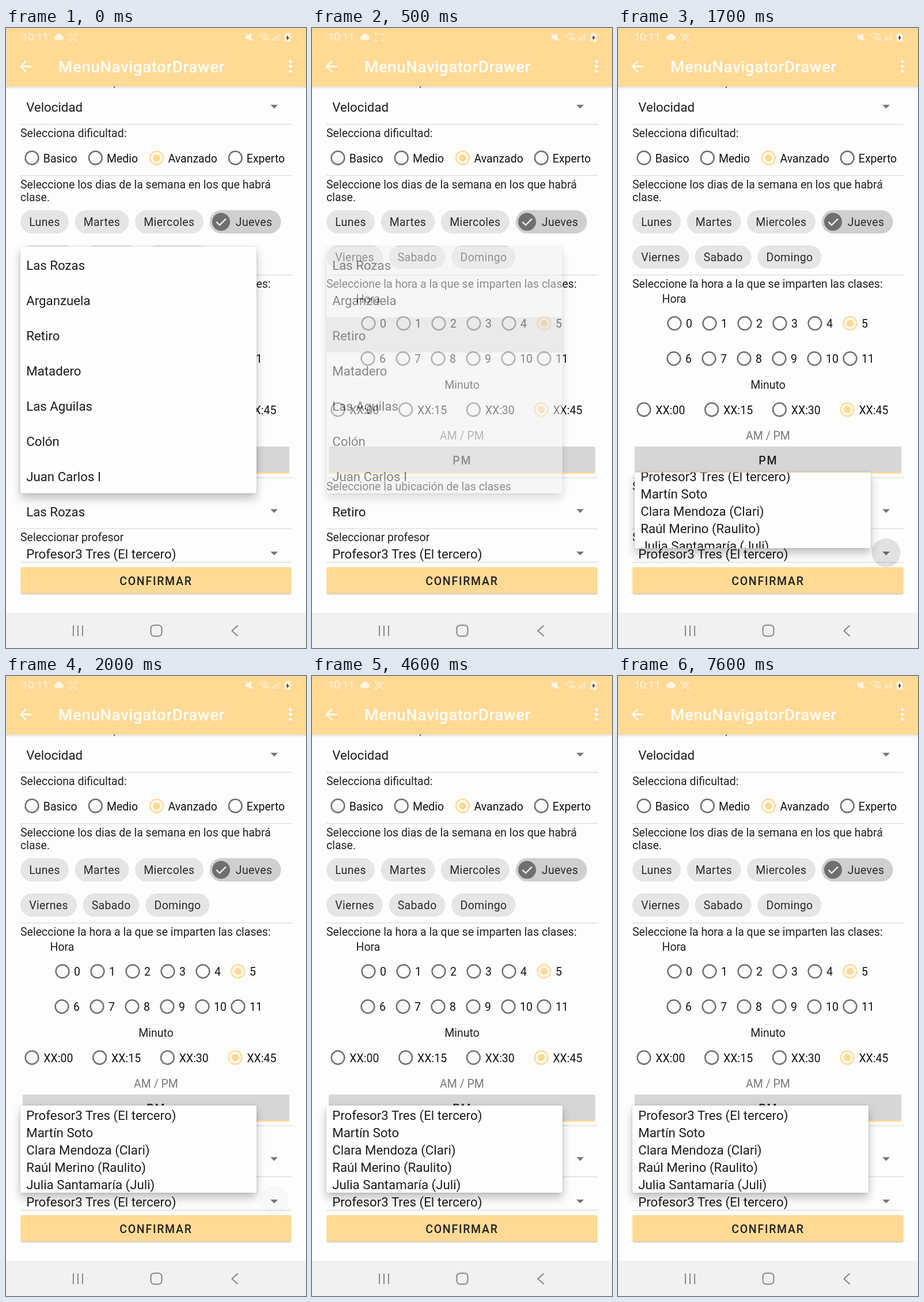
An HTML page that plays this animation: 521 by 1074 pixels, repeating every 8 s.

```html
<!DOCTYPE html>
<html lang="es">
<head>
<meta charset="utf-8">
<title>MenuNavigatorDrawer</title>
<style>
  html, body { margin: 0; width: 100%; height: 100%; overflow: hidden; background: #fdfdfd; }
  body { position: relative; font-family: Roboto, "Open Sans", sans-serif; }
  svg { position: absolute; left: 0; top: 0; display: block; }
  text { font-size: 19.5px; fill: #212121; }
  .big { font-size: 22.28px; fill: #1c1c1c; }
  .radio { fill: #111; }
  .chip { letter-spacing: .35px; fill: #2b2b2b; }
  .btn { font-weight: 500; letter-spacing: 1.74px; }
  .title { font-size: 27.85px; font-weight: 500; letter-spacing: .5px; fill: #fffdf8; }

  .popup {
    position: absolute; left: 25px; width: 410px; overflow: hidden; border-radius: 2px;
    background: #fefefe; color: #1c1c1c; font-size: 22.28px; white-space: nowrap;
    box-shadow: 0 9px 16px rgba(0,0,0,.24), 0 0 5px rgba(0,0,0,.13);
  }
  .popup p { position: relative; margin: 0; padding-left: 10.2px; }
  .popup span { position: relative; top: 2px; }
  #places { top: 379px; height: 427px; animation: places 8s linear infinite; }
  #places p { line-height: 61px; }
  #hit { animation: hit 8s linear infinite; }
  #staff { top: 744px; height: 151px; animation: reveal 8s infinite, appear 8s linear infinite; }
  #staff p { line-height: 30px; }
  #rows { animation: rows 8s infinite; }
  #before { animation: before 8s step-end infinite; }
  #after { animation: after 8s step-end infinite; }
  #ripple { transform-origin: 465.5px 909px; animation: ripple 8s ease-out infinite; }
  #lens { animation: blink 1s step-end infinite; }

  @keyframes places {
    0%, 5% { opacity: 1; background: #fefefe; }
    6.25% { opacity: .53; background: #f0f0f0; }
    7.6%, 100% { opacity: 0; background: #f0f0f0; }
  }
  @keyframes hit {
    0%, 3.5% { background: transparent; }
    5%, 100% { background: rgba(0,0,0,.09); }
  }
  @keyframes before { 0% { opacity: 1; } 5.5%, 100% { opacity: 0; } }
  @keyframes after { 0% { opacity: 0; } 5.5%, 100% { opacity: 1; } }
  @keyframes reveal {
    0%, 19.75% { left: 53px; top: 909px; height: 21px; animation-timing-function: cubic-bezier(0,0,.2,1); }
    22.75%, 100% { left: 25px; top: 744px; height: 151px; }
  }
  @keyframes rows {
    0%, 19.75% { transform: translateY(-65px); animation-timing-function: cubic-bezier(0,0,.2,1); }
    22.75%, 100% { transform: none; }
  }
  @keyframes appear {
    0%, 19.75% { opacity: 0; }
    21%, 100% { opacity: 1; }
  }
  @keyframes ripple {
    0%, 15.8% { opacity: 0; transform: scale(.5); }
    18%, 23.5% { opacity: 1; transform: none; }
    26%, 100% { opacity: 0; transform: none; }
  }
  @keyframes blink {
    0% { opacity: .6; }
    10% { opacity: 0; }
    52% { opacity: .5; }
    60%, 100% { opacity: 1; }
  }
</style>
</head>
<body>
<svg id="screen" width="521" height="1074" viewBox="0 0 521 1074"></svg>
<div class="popup" id="places"></div>
<div class="popup" id="staff"><div id="rows"></div></div>

<script>
const GOLD = '#ffda95', GREY = '#707070';
const $ = id => document.getElementById(id);

const text = (x, y, s, cls = '', extra = '') => `<text x="${x}" y="${y}" class="${cls}" ${extra}>${s}</text>`;
const rect = (x, y, w, h, fill, r = 0) => `<rect x="${x}" y="${y}" width="${w}" height="${h}" rx="${r}" fill="${fill}"/>`;
const dot = (x, y, r, fill, extra = '') => `<circle cx="${x}" cy="${y}" r="${r}" fill="${fill}" ${extra}/>`;
const stroke = (d, color, w, extra = '') => `<path d="${d}" fill="none" stroke="${color}" stroke-width="${w}" ${extra}/>`;
const fill = (d, color) => `<path d="${d}" fill="${color}"/>`;
const rule = y => rect(25, y - .75, 471, 1.5, '#dedede');
const arrow = y => fill(`M459.3 ${y - 3.2}h12.8l-6.4 6.4z`, '#757575');

function radio(x, y, label, lx, on) {
  const c = on ? GOLD : GREY;
  return dot(x, y, 11.4, 'none', `stroke="${c}" stroke-width="2.5"`) +
    (on ? dot(x, y, 6.4, c) : '') + text(lx, y + 7.5, label, 'radio');
}

const chip = (x, y, w, label) => rect(x, y, w, 40.5, '#e5e5e5', 20.2) + text(x + 15.2, y + 27, label, 'chip');

function statusBar() {
  const w = '#fff6e4', dim = '#ffebc4';
  return text(28, 22.3, '10:11', '', `style="font-size:18.3px;fill:${w}"`) +
    fill('M87 20.5a4 4 0 0 1 0-7.6a5.5 5.5 0 0 1 9.5-.5a4.2 4.2 0 0 1 .5 8.1z', w) +
    stroke('M110 12.5v-2.500h3M120 10h3v2.500M123 19.500v2.500h-3M113 22h-3v-2.500', w, 1.4) +
    `<g id="lens">${dot(116.5, 16, 3.4, 'none', `stroke="${w}" stroke-width="1.5"`)}</g>` +
    fill('M416 13h4l6-4v14l-6-4h-4z', w) + stroke('M416 9l14 13', w, 1.7) +
    stroke('M439 13q8-7 16 0M442 16.500q5-4.500 10 0M445 19.500q2-2 4 0', dim, 1.8) +
    fill('M450 21v-4h2v4zM454 17h2v4h-2z', w) +
    [0, 1, 2, 3].map(i => rect(462 + i * 3.7, 19 - i * 3, 2, 3 + i * 3, i < 2 ? w : dim)).join('') +
    rect(487, 8.5, 4, 2, w) + rect(484, 10, 10, 13.5, w, 1.5) +
    fill('M490 12l-4 5.500h2.500l-.8 4.500l4.300-6h-2.600z', '#3b3630');
}

function toolbar() {
  return rect(0, 101, 521, 5, 'url(#shade)') + rect(187, 101, 2, 2.5, '#333') +
    rect(0, 0, 521, 101.5, GOLD) + statusBar() +
    stroke('M44 66.500H26M34.500 57.500L25.500 66.500L34.500 75.500', '#fffdf8', 2.5) +
    text(91, 77, 'MenuNavigatorDrawer', 'title') +
    [58, 66.5, 75].map(y => dot(494, y, 2.6, '#fffdf8')).join('');
}

function levels() {
  return text(25, 189, 'Selecciona dificultad:') +
    radio(45, 225, 'Basico', 64.8) + radio(155.3, 225, 'Medio', 175) +
    radio(261.5, 225, 'Avanzado', 281.5, true) + radio(398.3, 225, 'Experto', 417.8);
}

function days() {
  return text(25, 277.7, 'Seleccione los dias de la semana en los que habrá') + text(25, 300.3, 'clase.') +
    chip(25, 315.5, 84, 'Lunes') + chip(119.5, 315.5, 94, 'Martes') + chip(224, 315.5, 119, 'Miercoles') +
    rect(353.5, 315.5, 124, 40.5, '#cfcfcf', 20.2) + dot(373.5, 335.7, 15.5, '#6f6f6f') +
    stroke('M365.500 336l5.500 5.500L382 330.500', '#fff', 2.2) + text(398.8, 342.5, 'Jueves', 'chip') +
    chip(25, 376.5, 98, 'Viernes') + chip(133.5, 376.5, 98, 'Sabado') + chip(242.3, 376.5, 111, 'Domingo');
}

function hours() {
  let s = text(25, 450, 'Seleccione la hora a la que se imparten las clases:') + text(76.5, 475.8, 'Hora');
  for (let h = 0; h < 12; h++) {
    const low = h > 5, last = h % 6 === 5;
    const x = 98 + 61 * (h % 6) - (low && !last ? 1 : 0);
    s += radio(x, low ? 572.6 : 511.6, h, x + 20, h === 5);
  }
  s += rect(254, 603, 13, 1, '#e2e2e2') + text(260.5, 625.3, 'Minuto', '', 'text-anchor="middle"');
  ['00', '15', '30', '45'].forEach((m, i) => {
    const x = 45 + 117.7 * i;
    s += radio(x, 661, 'XX:' + m, x + 20.3, i === 3);
  });
  return s + text(260.5, 712.5, 'AM / PM', '', 'text-anchor="middle" style="fill:#777"') +
    rect(29, 725, 463, 47, '#d6d6d6', 2) + rect(29.5, 769, 462, 2.6, GOLD) + text(244.3, 755.8, 'PM', 'btn');
}

function choices() {
  return text(25, 801, 'Seleccione la ubicación de las clases') +
    `<g id="before">${text(35.2, 845.5, 'Las Rozas', 'big')}</g>` +
    `<g id="after">${text(35.2, 845.5, 'Retiro', 'big')}</g>` +
    text(25, 889.3, 'Seleccionar profesor') + text(35.2, 918.7, staff[0], 'big') +
    dot(465.5, 909, 25, 'rgba(0,0,0,.11)', 'id="ripple"') +
    rect(25, 936, 471, 46, 'rgba(0,0,0,.1)', 4) + rect(25.5, 935, 470, 46, 'rgba(0,0,0,.1)', 4) +
    rect(25, 934, 471, 46, GOLD, 4) + text(197.2, 965, 'CONFIRMAR', 'btn');
}

function navBar() {
  const c = '#858585';
  return rect(0, 1013, 521, 61, '#f1f1f1') +
    stroke('M117 1035v18.500M125 1035v18.500M133 1035v18.500', c, 1.9) +
    `<rect x="251.500" y="1034.500" width="19" height="19" rx="5.500" fill="none" stroke="${c}" stroke-width="2"/>` +
    stroke('M402.500 1035l-10 9.200l10 9.200', c, 2);
}

const places = ['Las Rozas', 'Arganzuela', 'Retiro', 'Matadero', 'Las Aguilas', 'Colón', 'Juan Carlos I'];
const staff = ['Profesor3 Tres (El tercero)', 'Martín Soto', 'Clara Mendoza (Clari)',
  'Raúl Merino (Raulito)', 'Julia Santamaría (Juli)'];

$('screen').innerHTML =
  `<defs><linearGradient id="shade" x2="0" y2="1"><stop stop-color="#000" stop-opacity=".13"/>
  <stop offset="1" stop-color="#000" stop-opacity="0"/></linearGradient></defs>` +
  rect(0, 0, 521, 1074, '#fdfdfd') + toolbar() + text(35.2, 144.7, 'Velocidad', 'big') +
  [167, 255.5, 428, 779, 867.5, 925.5].map(rule).join('') +
  [136.3, 836.8, 910.3].map(arrow).join('') +
  levels() + days() + hours() + choices() + navBar();

const list = (items, hit) => items.map(s => `<p${s === hit ? ' id="hit"' : ''}><span>${s}</span></p>`).join('');
$('places').innerHTML = list(places, 'Retiro');
$('rows').innerHTML = list(staff);
</script>
</body>
</html>
```
